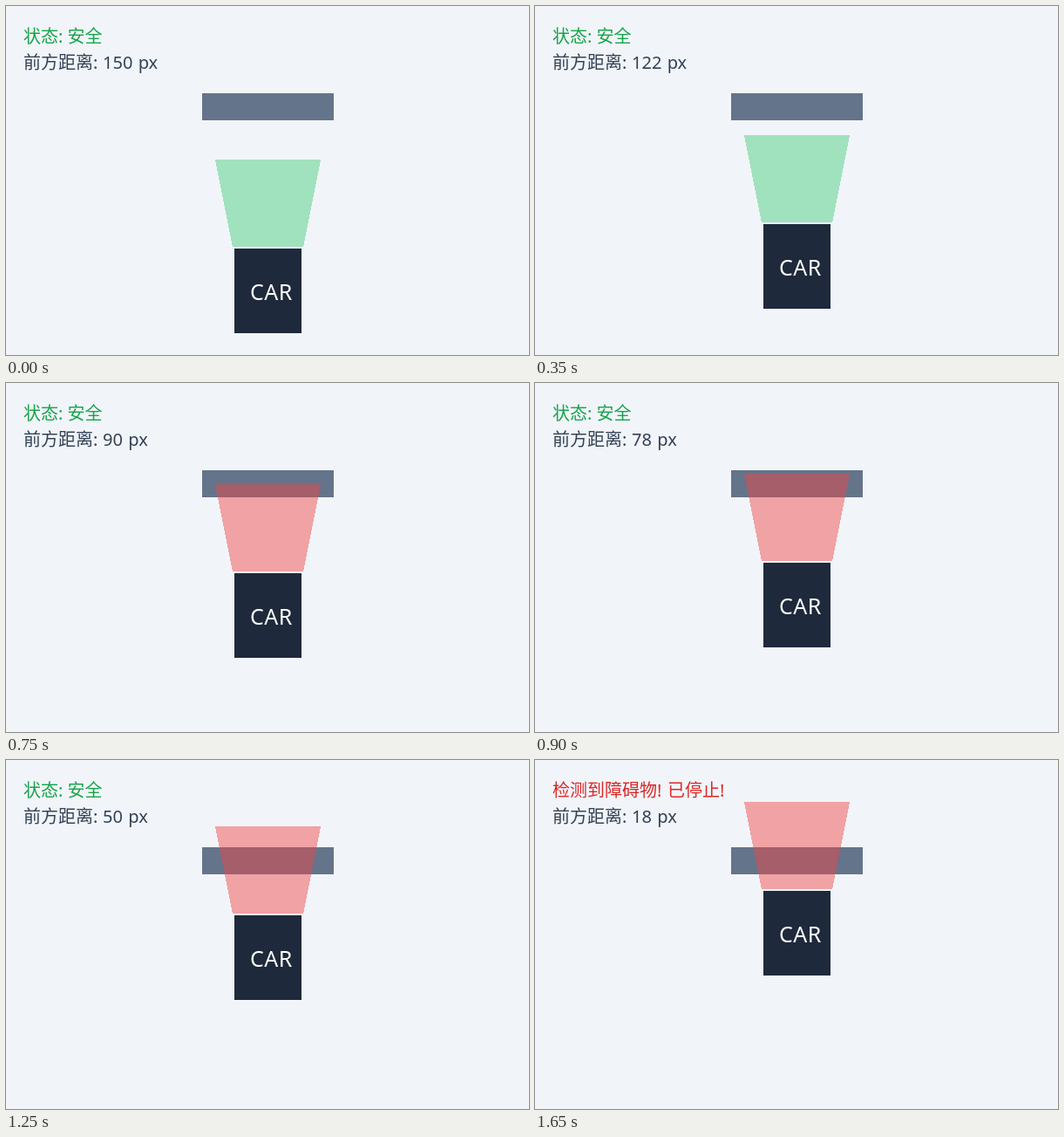
Write an HTML page with a canvas that moves like this. It is 600 by 400 pixels and loops after 4.5 s.

```html
<!DOCTYPE html>
<html lang="zh-CN">
<head>
<meta charset="utf-8">
<title>障碍物检测</title>
<style>
  html, body { margin: 0; width: 100%; height: 100%; overflow: hidden; background: #f1f5f9; }
  canvas { display: block; }
</style>
</head>
<body>
<canvas id="stage" width="600" height="400"></canvas>
<script>
const ctx = document.getElementById('stage').getContext('2d');
const FONT = '"Noto Sans", "Open Sans", "Noto Sans CJK SC", "Noto Sans CJK", sans-serif';
const LOOP = 4500, TICK = 50, SPEED = 4;
const START = 150, WARN = 100, STOP = 20;
const LAST = Math.ceil((START - STOP) / SPEED);

function rect(x, y, w, h, color) {
  ctx.fillStyle = color;
  ctx.fillRect(x, y, w, h);
}

function text(str, x, y, color, size = 20, wordGap = 0, letterGap = 0) {
  ctx.font = `${size}px ${FONT}`;
  ctx.wordSpacing = wordGap + 'px';
  ctx.letterSpacing = letterGap + 'px';
  ctx.fillStyle = color;
  ctx.fillText(str, x, y);
}

// Sensor cone, filled row by row for hard pixel edges
function cone(top, color) {
  for (let row = 0; row < 100; row++) {
    const inset = Math.round(row / 5);
    rect(240 + inset, top + row, 121 - 2 * inset, 1, color);
  }
}

function draw(time) {
  const step = Math.min(LAST, Math.floor((time % LOOP) / TICK));
  const dist = START - step * SPEED;
  // The car holds still on the step that triggers the stop
  const moved = Math.min(step, LAST - 1) * SPEED;
  const front = 276 - moved;

  rect(0, 0, 600, 400, '#f1f5f9');
  rect(225, 100, 151, 31, '#64748b');
  cone(front - 100, dist < WARN ? 'rgba(239,68,68,.47)' : 'rgba(34,197,94,.392)');
  rect(262, front + 2, 77, 97, '#1e293b');
  text('CAR', 280, front + 61, '#fff', 25, 0, 0.5);

  if (dist < STOP) text('检测到障碍物! 已停止!', 20, 42, '#dc2626', 20, 1.4);
  else text('状态: 安全', 20, 42, '#16a34a');
  text('前方距离:', 20, 72, '#334155');
  text(dist + ' px', 111, 72, '#334155', 20, 1.2);
}

const begin = performance.now();
function frame() {
  draw(performance.now() - begin);
  requestAnimationFrame(frame);
}
frame();
</script>
</body>
</html>
```
